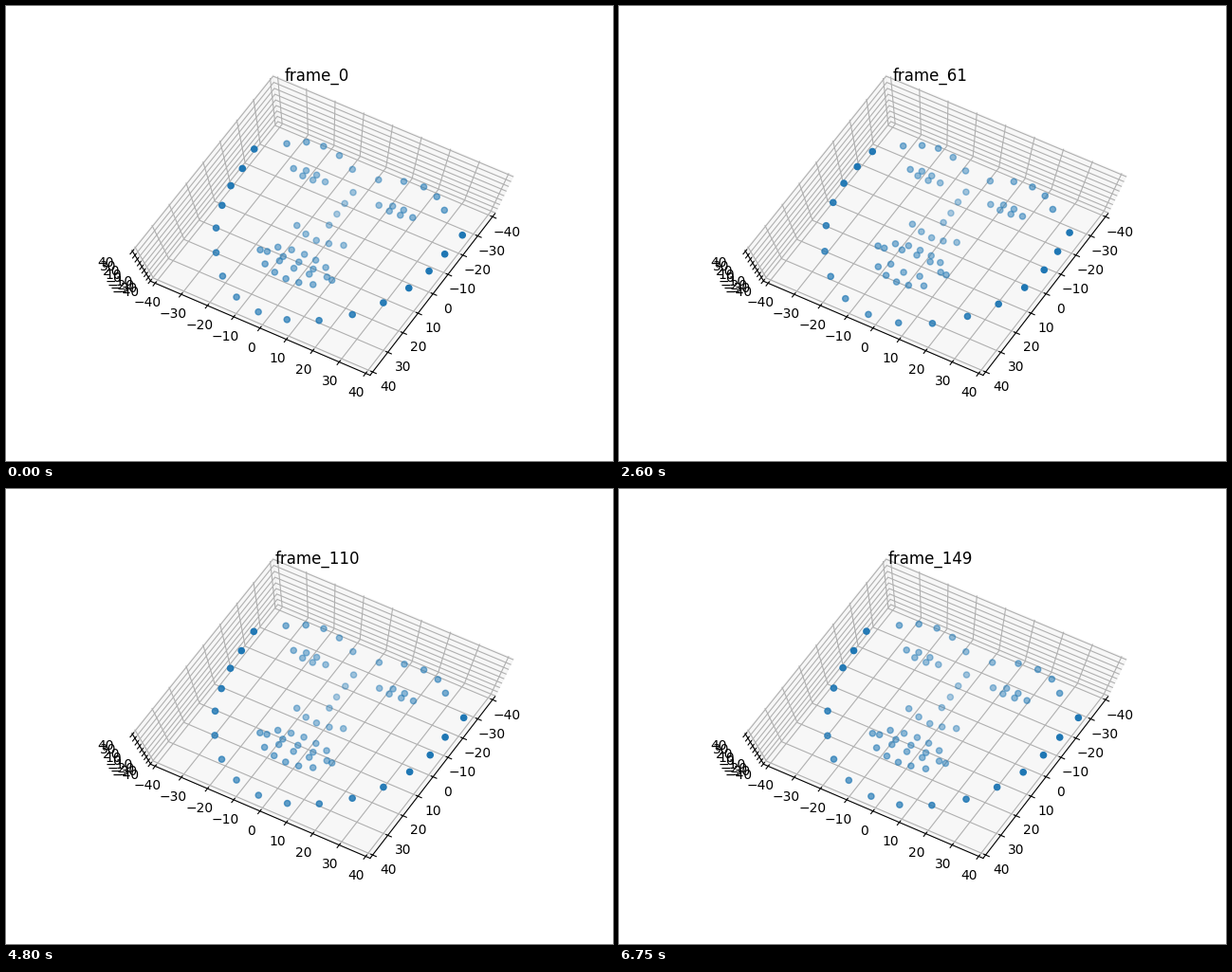
A matplotlib script for the animation above (6.8 s loop, 640 px wide and 480 px high).

```python
import numpy as np
import matplotlib.pyplot as plt
from matplotlib.animation import FuncAnimation
from matplotlib.patches import Polygon

W, H, FRAMES, INTERVAL = 640, 480, 136, 50
LIM, STEP = 40, 80 / 12
EDGE = LIM + STEP / 4

fig = plt.figure(figsize=(W / 100, H / 100), dpi=100, facecolor="white")
ax = fig.add_axes([0, 0, 1, 1])
ax.set(xlim=(0, W), ylim=(H, 0))
ax.axis("off")

# Camera: elevation 80, azimuth -60, distance 10, y axis reversed
EL, AZ, DIST = np.radians(80), np.radians(-60), 10
RIGHT = np.array([-np.sin(AZ), np.cos(AZ), 0])
UP = np.array([-np.cos(AZ) * np.sin(EL), -np.sin(AZ) * np.sin(EL), np.cos(EL)])
EYE = np.array([np.cos(AZ) * np.cos(EL), np.sin(AZ) * np.cos(EL), np.sin(EL)])


def project(p):
    """Data coordinates to pixels, y down."""
    q = np.asarray(p, float) * [1, -1, 1] / (2 * LIM)
    depth = DIST - q @ EYE
    sx = (q @ RIGHT / depth + 0.095) / 0.185
    sy = (q @ UP / depth + 0.095) / 0.185
    return np.array([80 + 496 * sx, 427.2 - 369.6 * sy]).T


def line(points, color="black", z=3):
    x, y = project(points).T
    ax.plot(x, y, color=color, lw=0.8, zorder=z)


def at(axis, value, rest):
    p = np.array(rest, float)
    p[axis] = value
    return p


def draw_pane(axis):
    a, b = [i for i in range(3) if i != axis]
    corners = np.full((4, 3), -EDGE)
    corners[1:3, a] = EDGE
    corners[2:, b] = EDGE
    ax.add_patch(Polygon(project(corners), color=(0.945,) * 3 + (0.5,), lw=1, zorder=1))


def draw_axis(axis, corner, tick_dir):
    corner = np.array(corner) * EDGE
    back = np.full(3, -EDGE)
    line([at(axis, -EDGE, corner), at(axis, EDGE, corner)])
    out = np.sign(corner[tick_dir])
    shift = np.sign(corner) * 11.5 * 48 / 623.2 * STEP
    for v in range(-LIM, LIM + 1, 10):
        p0 = at(axis, v, back)
        line([at((axis + 1) % 3, EDGE, p0), p0, at((axis + 2) % 3, EDGE, p0)],
             "#b0b0b0", 2)
        p = at(axis, v, corner)
        line([at(tick_dir, p[tick_dir] + k * out * STEP, p) for k in (-0.1, 0.2)])
        x, y = project(p + at(axis, 0, shift))
        ax.text(x, y, str(v).replace("-", "\u2212"), fontsize=10,
                ha="center", va="top", zorder=4)


for i in range(3):
    draw_pane(i)
draw_axis(0, (0, 1, -1), 1)
draw_axis(1, (1, 0, -1), 0)
draw_axis(2, (-1, 1, 0), 1)

# The face is built in pixels, as complex numbers x + yj
DOWN = -0.6 + 0.8j


def curve(keys, n):
    """n points on a smooth curve through evenly spaced keys."""
    t = np.linspace(-1, 1, len(keys))
    fit = np.polyfit(t, keys, min(len(keys) - 1, 6))
    return np.polyval(fit, np.linspace(-1, 1, n))


def lens(left, right, n, up, down):
    """Closed outline of an eye or a lip: n steps over the top, n back below."""
    s = np.arange(n + 1) / n
    bow = DOWN * np.sqrt(np.abs(np.sin(np.pi * s)))
    base = left + (right - left) * s
    return np.concatenate([(base - up * bow)[:-1], (base + down * bow)[:0:-1]])


def mouth(gap):
    outer = lens(268 + 257j, 344 + 289j, 6, 14 + gap, 18 + 11 * gap)
    inner = lens(275 + 259j, 338 + 286j, 4, 3 + 4 * gap, 5 + 11 * gap)
    return np.concatenate([outer, inner])


JAW = curve([262 + 151j, 237 + 189.5j, 223 + 234.5j, 227.5 + 284j, 266 + 323.5j,
             332 + 331j, 396 + 314j, 446.5 + 280j, 481.5 + 241.5j], 17)
UPPER = np.concatenate([
    curve([296 + 145j, 335 + 148j, 365.5 + 172.5j], 5),
    curve([393 + 183.5j, 440 + 191j, 462.5 + 215.5j], 5),
    curve([366 + 196.5j, 340.5 + 231j], 4),
    curve([306.5 + 231.5j, 327.5 + 247j, 355.5 + 252.5j], 5),
    lens(303.5 + 171j, 337 + 186j, 3, 3.5, 3.5),
    lens(393.5 + 210j, 429 + 223.5j, 3, 4.5, 2.5)])
BULGE = 0.11 * np.sqrt(np.abs(np.sin(np.linspace(0, np.pi, 17))))

# Nearer points are more opaque: the jaw most, the nose least
REST = np.concatenate([JAW, UPPER, mouth(0)])
alpha = 0.36 + 0.0021 * np.abs(REST - (352 + 216j))
alpha[:17] = np.clip(curve([0.97, 0.82, 0.67, 0.94, 1], 17), 0, 1)

KEYS = [0, 23, 52, 64, 83, 109, 135]
COUNT = [0, 28, 61, 74, 96, 123, 149]
ZOOM = [0, -0.018, 0, -0.036, -0.018, 0.032, 0.015]
TALK = [0, 0.25, 1, 0, 0, 0, 0]
rng = np.random.default_rng(4)
JITTER = rng.normal(0, 0.25, (FRAMES, len(REST), 2)) @ [1, 1j]


def face(i):
    zoom, talk = np.interp(i, KEYS, ZOOM), np.interp(i, KEYS, TALK)
    jaw = JAW + talk * BULGE * (JAW - (345 + 235j))
    p = np.concatenate([jaw, UPPER, mouth(talk)])
    p = p + zoom * (p - (335 + 235j)) - 0.055 * talk * (REST - (365 + 195j))
    return p + JITTER[i]


colors = [(31 / 255, 119 / 255, 180 / 255, a) for a in alpha]
dots = ax.scatter(REST.real, REST.imag, s=20, c=colors, zorder=5)
title = ax.text(328, 78.84, "frame_0", fontsize=12, ha="center", va="baseline", zorder=6)


def update(i):
    p = face(i)
    dots.set_offsets(np.column_stack([p.real, p.imag]))
    title.set_text(f"frame_{round(np.interp(i, KEYS, COUNT))}")
    return dots, title


anim = FuncAnimation(fig, update, frames=FRAMES, interval=INTERVAL,
                     repeat=True, repeat_delay=0, blit=False)
plt.show()
```
